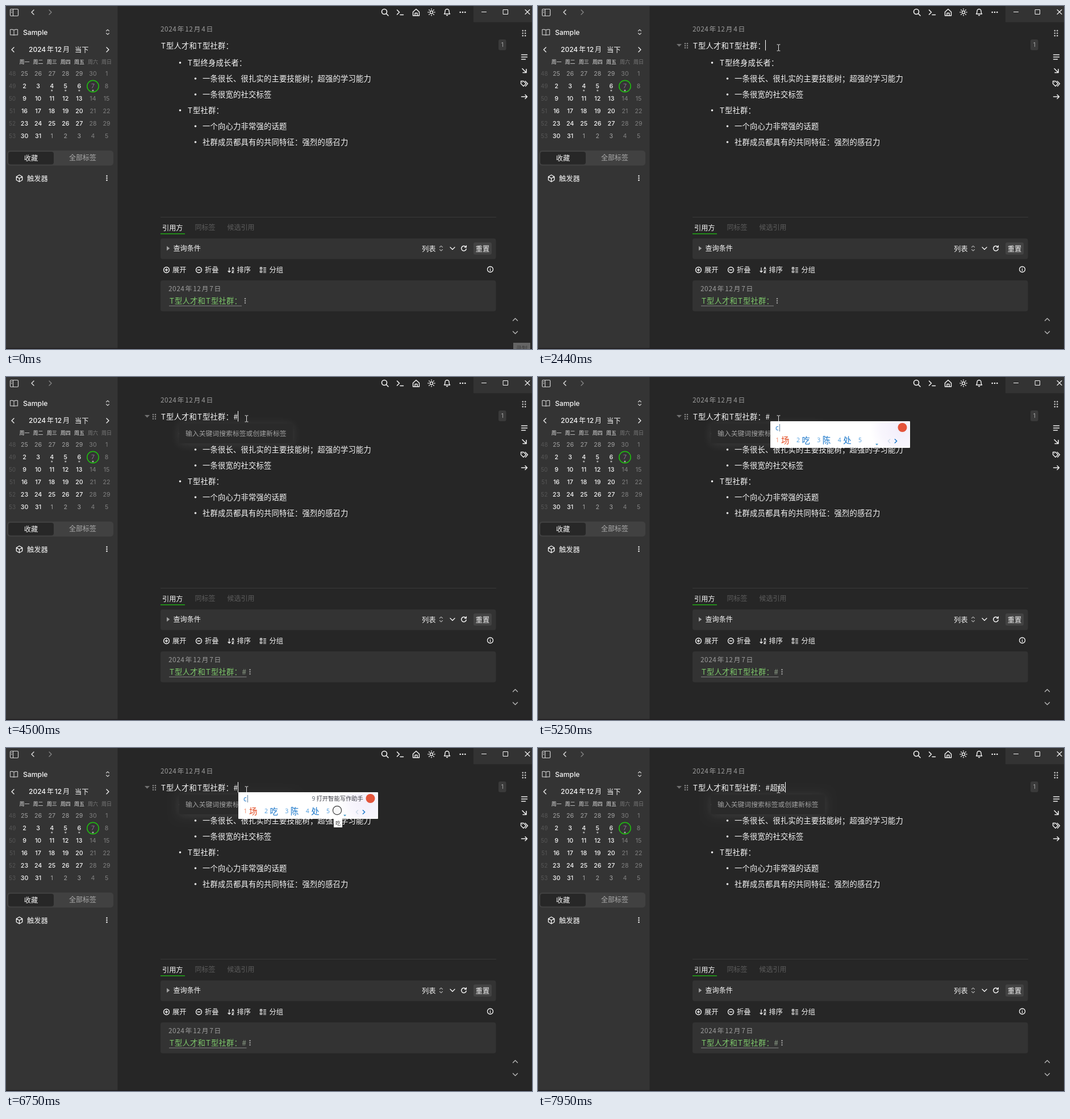
An HTML page with a canvas that plays this animation: 926 by 605 pixels, repeating every 8000 ms.

```html
<!DOCTYPE html>
<html lang="zh-CN">
<head>
<meta charset="utf-8">
<title>Notes</title>
<style>
html, body { margin: 0; width: 100%; height: 100%; overflow: hidden; background: #262626; }
canvas { display: block; width: 926px; height: 605px; }
</style>
</head>
<body>
<canvas id="stage"></canvas>
<script>
const W = 926, H = 605, LOOP = 8000;
const cv = document.getElementById('stage');
const g = cv.getContext('2d');
const dpr = window.devicePixelRatio || 1;
cv.width = W * dpr;
cv.height = H * dpr;

const UI = 'Inter, "Noto Sans CJK SC", sans-serif';
const CJK = '"Noto Sans CJK SC", "Noto Sans CJK JP", sans-serif';
const LATIN = '"Open Sans", sans-serif';
const WHITE = '#f6f6f6', GREY = '#9c9c9c', GREEN = '#1fc20f';

const clamp = v => Math.max(0, Math.min(1, v));
const ramp = (t, a, b) => clamp((t - a) / (b - a));
const ease = p => p * p * (3 - 2 * p);

function rect(x, y, w, h, color, r = 0) {
  g.fillStyle = color;
  g.beginPath();
  g.roundRect(x, y, w, h, r);
  g.fill();
}

function disc(x, y, r, color) {
  g.fillStyle = color;
  g.beginPath();
  g.arc(x, y, r, 0, Math.PI * 2);
  g.fill();
}

// y is the visual middle of the glyphs; returns the advance width
function text(s, x, y, size, color = WHITE, o = {}) {
  g.font = `${o.weight || 400} ${size}px ${o.font || CJK}`;
  g.textAlign = o.align || 'left';
  g.letterSpacing = (o.gap || 0) + 'px';
  g.fillStyle = color;
  g.fillText(s, x, Math.round(y + size * 0.37));
  const w = g.measureText(s).width;
  g.letterSpacing = '0px';
  return w;
}

// date with a small space between digits and characters
function dated(s, x, y, size, pad, color, o) {
  for (const run of s.match(/\d+|\D+/g)) x += text(run, x, y, size, color, o) + pad;
}

const advance = c => c === 'T' ? 10 : c === '#' ? 8.5 : 13.5;

function prose(s, x, y, color = WHITE) {
  for (const c of s) {
    const w = advance(c);
    text(c, x + w / 2, y, 13.3, color, { align: 'center', weight: 500 });
    x += w;
  }
  return x;
}

// icon path relative to its centre
function icon(d, x, y, color = WHITE, lw = 1.4) {
  g.save();
  g.translate(x, y);
  g.strokeStyle = color;
  g.lineWidth = lw;
  g.lineCap = g.lineJoin = 'round';
  g.stroke(new Path2D(d));
  g.restore();
}

function dots(x, y, cols, rows, dx, dy, r, color) {
  for (let i = 0; i < cols; i++)
    for (let j = 0; j < rows; j++)
      disc(x + (i - (cols - 1) / 2) * dx, y + (j - (rows - 1) / 2) * dy, r, color);
}

function tri(x, y, pts, color) {
  g.fillStyle = color;
  g.save();
  g.translate(x, y);
  g.fill(new Path2D(pts));
  g.restore();
}

const LEFT = 'M2-4L-2 0L2 4', RIGHT = 'M-2-4L2 0L-2 4';
const DOWN = 'M-4-2L0 2L4-2', UP = 'M-4 2L0-2L4 2';
const SORTER = 'M-2.5-2L0-4.3L2.5-2M-2.5 2L0 4.3L2.5 2';
const RING = 'M5 0A5 5 0 1 1-5 0A5 5 0 1 1 5 0';

function calendar() {
  icon(LEFT, 12, 77, WHITE, 1.3);
  icon(RIGHT, 179, 77, WHITE, 1.3);
  dated('2024年12月', 40, 77, 12, 1.8, WHITE, { font: UI, weight: 500 });
  text('当下', 121, 77, 12.2);
  const col = i => 32.5 + i * 24.1;
  [...'一二三四五六日'].forEach((d, i) =>
    text('周' + d, col(i), 99, 9, i > 4 ? '#7c7c7c' : '#e6e6e6', { align: 'center' }));
  for (let r = 0; r < 6; r++) {
    const y = 119.5 + r * 22;
    text(String(48 + r), 11, y, 10, '#565656', { font: UI, align: 'center' });
    for (let c = 0; c < 7; c++) {
      const n = r * 7 + c - 5;
      const inside = n >= 1 && n <= 31;
      const day = n < 1 ? n + 30 : n > 31 ? n - 31 : n;
      let color = inside && c < 5 ? WHITE : c > 4 ? '#7f7f7f' : '#a2a2a2';
      if (n === 7) color = '#8d6a96';
      text(String(day), col(c), y, 10.7, color,
        { font: UI, align: 'center', weight: inside && c < 5 ? 500 : 400 });
      if (n >= 4 && n <= 7) disc(col(c), 149, 1.6, '#a9a9a9');
    }
  }
  g.strokeStyle = GREEN;
  g.lineWidth = 1.5;
  g.beginPath();
  g.arc(153, 141.5, 10.2, 0, 7);
  g.stroke();
}

function sidebar() {
  rect(0, 0, 196.5, H, '#343434');
  icon('M-7-4.5Q-7-6-5.5-6H5.5Q7-6 7-4.5V4.5Q7 6 5.5 6H-5.5Q-7 6-7 4.5ZM-2-6V6M-5-3H-4M-5 0H-4', 14.5, 11.5, '#d0d0d0', 1.2);
  icon(LEFT, 47, 11, '#e0e0e0', 1.4);
  icon(RIGHT, 78, 11, '#858585', 1.4);
  icon('M0-4Q-2-5.5-6.5-5V4.5Q-2 4 0 5Q2 4 6.5 4.5V-5Q2-5.5 0-4V5', 14, 46.5, '#c4c4c4', 1.2);
  text('Sample', 30, 46.5, 12.2, WHITE, { font: UI, weight: 500 });
  icon(SORTER, 179, 46, '#c8c8c8', 1.2);
  calendar();
  rect(2, 255, 187, 26.5, '#414141', 5);
  rect(4, 257, 80, 22.5, '#272727', 4);
  text('收藏', 44, 268, 12.2, WHITE, { align: 'center', weight: 500 });
  text('全部标签', 135, 268, 12, '#acacac', { align: 'center' });
  icon('M0-6L5.2-3V3L0 6L-5.2 3V-3ZM-5.2-3L0 0L5.2-3M0 0V6', 23.5, 304, WHITE, 1.3);
  text('触发器', 37, 304, 12.3);
  dots(177.5, 303.5, 1, 3, 0, 3.8, 1.2, WHITE);
}

function chrome() {
  rect(823, 0, 103, 28.5, '#333333');
  icon('M3.5-1A4.5 4.5 0 1 1-5.5-1A4.5 4.5 0 1 1 3.5-1M2.5 2.5L6 6', 667, 11, WHITE, 1.6);
  icon('M-5.5-4L-1.5 0L-5.5 4M0 4.5H5.5', 694, 11, WHITE, 1.5);
  icon('M-5.5-.5L0-5.5L5.5-.5V6H-5.5ZM-2 6V1.5H2V6', 722, 11, WHITE, 1.4);
  icon('M2.5 0A2.5 2.5 0 1 1-2.5 0A2.5 2.5 0 1 1 2.5 0M0-6V-5M0 5V6M-6 0H-5M5 0H6M-4.2-4.2L-3.6-3.6M3.6 3.6L4.2 4.2M-4.2 4.2L-3.6 3.6M3.6-3.6L4.2-4.2', 749, 11, WHITE, 1.4);
  icon('M-5 3.5Q-3.5 2-3.5-1.5A3.5 3.5 0 0 1 3.5-1.5Q3.5 2 5 3.5ZM-1 6H1', 776.5, 10.5, WHITE, 1.4);
  dots(804, 11, 3, 1, 4.3, 0, 1.3, WHITE);
  icon('M-4 .5H4', 841.5, 10, WHITE, 1);
  icon('M-4-4H4V4H-4Z', 879.5, 10.5, WHITE, 1);
  icon('M-4-4L4 4M4-4L-4 4', 918, 10.5, WHITE, 1.1);

  dots(912, 48, 2, 3, 4.4, 4.4, 1.3, '#c8c8c8');
  rect(867, 59, 13.5, 19, '#3a3a3a', 3);
  text('1', 873.8, 68.5, 10, '#a5a5a5', { font: UI, align: 'center' });
  icon('M-5-4H5M-5 0H5M-5 4H2', 912.5, 90, '#eeeeee', 1.5);
  icon('M-3.5-3.5L3.5 3.5M3.5-2.5V3.5H-2.5', 912.5, 114, '#eeeeee', 1.6);
  icon('M-6-4.5H-1.5L3 0L-1.5 4.5L-6 0ZM1.5-4.5L6 0L2 4.5M-3.8-2.3H-3.7', 912.5, 137, '#eeeeee', 1.4);
  icon('M-5 0H5M1.5-3.5L5 0L1.5 3.5', 912.5, 160, '#eeeeee', 1.5);
  icon(UP, 896.5, 553, '#b8b8b8', 1.4);
  icon(DOWN, 896.5, 576, '#b8b8b8', 1.4);
}

const OUTLINE = [
  [0, 100, 'T型终身成长者：'],
  [1, 128, '一条很长、很扎实的主要技能树；超强的学习能力'],
  [1, 156, '一条很宽的社交标签'],
  [0, 184, 'T型社群：'],
  [1, 212, '一个向心力非常强的话题'],
  [1, 240, '社群成员都具有的共同特征：强烈的感召力']
];
const HEAD = 'T型人才和T型社群：';

const BLINKS = [1360, 1960, 2440, 2970, 3170, 3970, 4500, 5050, 5580, 6110, 6640, 7170, 7700];
const caretOn = t => BLINKS.filter(b => t >= b).length % 2 === 1;

function note(t) {
  dated('2024年12月4日', 272, 41, 11.9, 1.2, GREY, { gap: .5 });
  const typed = t >= 7950 ? '#超级' : t >= 3170 ? '#' : '';
  const end = prose(HEAD + typed, 272, 70);
  for (const [lvl, y, s] of OUTLINE) {
    disc(306.5 + lvl * 27, y, 1.8, WHITE);
    prose(s, 319 + lvl * 27, y);
  }
  g.globalAlpha = ramp(t, 680, 820);
  dots(261, 70, 2, 3, 4, 3.8, 1.2, '#8a8a8a');
  g.globalAlpha = ramp(t, 850, 1030);
  tri(248.5, 69, 'M-4.5-2H4.5L0 2.8Z', '#707070');
  g.globalAlpha = 1;
  if (caretOn(t)) rect(Math.floor(end), 60, 1, 18.5, '#ffffff');
}

function backlinks(t) {
  rect(272, 372, 591, 1, '#393939');
  text('引用方', 275, 391, 12.2, WHITE, { weight: 500 });
  text('同标签', 332.5, 391, 12, '#5c5c5c');
  text('候选引用', 389.5, 391, 12, '#5c5c5c');
  rect(272, 401, 43, 1.5, '#22a816');

  rect(272, 410, 590.5, 36.5, '#333333', 4);
  tri(285.5, 427.5, 'M-2.5-4L2.8 0L-2.5 4Z', '#a0a0a0');
  text('查询条件', 294.5, 428, 12.1);
  text('列表', 732, 428, 12.3);
  icon(SORTER, 766, 427.5, '#b0b0b0', 1.1);
  icon(DOWN, 786, 427.5, WHITE, 1.3);
  icon('M4.2 1A4.3 4.3 0 1 1 3.2-2.8M4.3-4.8V-2H1.5', 806, 427.5, WHITE, 1.4);
  rect(823, 417, 32, 21.5, '#434343', 3);
  text('重置', 839, 428, 12.2, WHITE, { align: 'center', weight: 500 });

  icon(RING + 'M-2.3 0H2.3M0-2.3V2.3', 282.5, 465.5, WHITE, 1.3);
  text('展开', 293, 465, 12.2);
  icon(RING + 'M-2.3 0H2.3', 339.5, 465.5, WHITE, 1.3);
  text('折叠', 350, 465, 12.2);
  icon('M-3-4V4M-5 2L-3 4.2L-1 2M2-1L3.5-5L5-1M1.8 1.5H5L1.8 5H5', 396, 465.5, WHITE, 1.2);
  text('排序', 406.5, 465, 12.2);
  icon('M-5-4.3H-2V-1.3H-5ZM-5 1.5H-2V4.5H-5ZM1-4H5M1-1.3H5M1 1.8H5M1 4.5H5', 452.5, 465.5, WHITE, 1.2);
  text('分组', 463.5, 465, 12.2);
  icon(RING + 'M0-.3V2.4M0-2.4V-2.3', 852.5, 464.5, WHITE, 1.3);

  rect(272, 484, 590.5, 54.5, '#333333', 4);
  dated('2024年12月7日', 286, 499, 11.9, 1.2, GREY, { gap: .5 });
  let end = prose(HEAD, 287, 520, '#7fcb6c');
  if (t >= 3440) end = prose('#', end, 520, '#8fa08a');
  rect(287, 528.5, end - 287, 1, '#8a8a8a');
  dots(end + 6, 520, 1, 3, 0, 3.8, 1.2, '#a0a0a0');
}

function pointer(t) {
  if (t < 70) return;
  const p = ease(ramp(t, 70, 820));
  const x = 908 + (424 - 908) * p, y = 612 + (74 - 612) * p;
  if (y > 372 || x > 863) {
    g.save();
    g.translate(x, y);
    const arrow = new Path2D('M0 0V14L3.2 11L5.5 16L7.6 15L5.3 10.2H10Z');
    g.fillStyle = '#fff';
    g.strokeStyle = '#000';
    g.lineWidth = 1;
    g.fill(arrow);
    g.stroke(arrow);
    g.restore();
  } else {
    icon('M-2.5-5.5H-1Q0-5.5 0-4.5V4.5Q0 5.5-1 5.5H-2.5M2.5-5.5H1Q0-5.5 0-4.5M0 4.5Q0 5.5 1 5.5H2.5', x - .5, y - .5, '#e4e4e4', 1);
  }
}

function hint(t) {
  const a = ramp(t, 3200, 3440);
  if (!a) return;
  g.save();
  g.globalAlpha = a;
  g.shadowColor = 'rgba(255,255,255,.1)';
  g.shadowBlur = 18 * dpr;
  g.shadowOffsetY = 2 * dpr;
  rect(304.5, 82, 200.5, 35, '#2a2a2a', 4);
  g.restore();
  g.globalAlpha = a;
  text('输入关键词搜索标签或创建新标签', 316, 99.5, 11.85, '#a2a2a2');
  g.globalAlpha = 1;
}

const STAGES = [
  { at: 5250, key: 'c', right: 655, caret: 425, words: ['场', '吃', '陈', '处', ''] },
  { at: 7150, key: 'ic', right: 644, caret: 428, words: ['超', '吵', '抄', '炒', '朝'] },
  { at: 7620, key: "chao'ji", right: 716, caret: 460, words: ['超级', '超集', '潮际', '抄集', '超记'] }
];

function candidates(t) {
  if (t < 5250 || t >= 7950) return;
  const s = STAGES.filter(k => t >= k.at).pop();
  const r = s.right;
  rect(409, 78, r - 409, 47, '#ffffff', 1);
  const tint = g.createRadialGradient(r - 18, 92, 4, r - 18, 92, 52);
  tint.addColorStop(0, '#f3effb');
  tint.addColorStop(.6, '#f8f6fd');
  tint.addColorStop(1, '#ffffff');
  rect(r - 70, 79, 69, 45, tint);

  text(s.key, 418, 90, 12, '#1473c8', { font: LATIN, weight: 500 });
  rect(s.caret, 83, 1, 13, s.key === 'c' ? '#5f7d99' : '#e2602a');
  let x = 418.5;
  s.words.forEach((w, i) => {
    text(String(i + 1), x, 111.5, 10.5, i ? '#4c9bdc' : '#ee8a6c', { font: LATIN });
    text(w, x + 9.5, 111.5, 14.4, i ? '#1473c8' : '#e2461c');
    x += 22.4 + 14 * (w.length || 1);
  });
  icon('M1.7-3.3L-1.7 0L1.7 3.3', r - 37, 113, '#c5d5e4', 1.1);
  icon('M-1.7-3.3L1.7 0L-1.7 3.3', r - 25, 113, '#1473c8', 1.4);
  disc(r - 13.5, 89, 8, '#e4543a');

  if (s.key !== 'c') return;
  tri(596.5, 119, 'M-2.5-1.2H2.5L0 1.5Z', '#3d93c4');
  if (t < 5460 || t >= 7080) return;
  g.globalAlpha = ramp(t, 5460, 5600);
  text('9', 538.5, 89, 10, '#55606c', { font: LATIN });
  text('打开智能写作助手', 546.5, 89, 10.3, '#3c3c44');
  disc(583, 110, 8.2, '#3a3a3a');
  disc(583, 110, 7, '#f7f7f7');
  rect(577, 125, 15, 15, '#ffffff');
  text('吃', 584.5, 132.5, 9, '#333333', { align: 'center' });
  g.globalAlpha = 1;
}

function recorder() {
  rect(893, 594, 30, 11, '#656565');
  g.save();
  g.beginPath();
  g.rect(893, 594, 30, 11);
  g.clip();
  text('录制', 908, 604.5, 10, '#3c3c3c', { align: 'center' });
  g.restore();
}

function draw(t) {
  g.setTransform(dpr, 0, 0, dpr, 0, 0);
  rect(0, 0, W, H, '#262626');
  sidebar();
  chrome();
  note(t);
  backlinks(t);
  rect(0, 603.5, W, 1.5, '#1f1c1f');
  if (t < 70) recorder();
  hint(t);
  pointer(t);
  candidates(t);
}

const start = performance.now();
function tick() {
  draw((performance.now() - start) % LOOP);
  requestAnimationFrame(tick);
}
tick();
</script>
</body>
</html>
```
